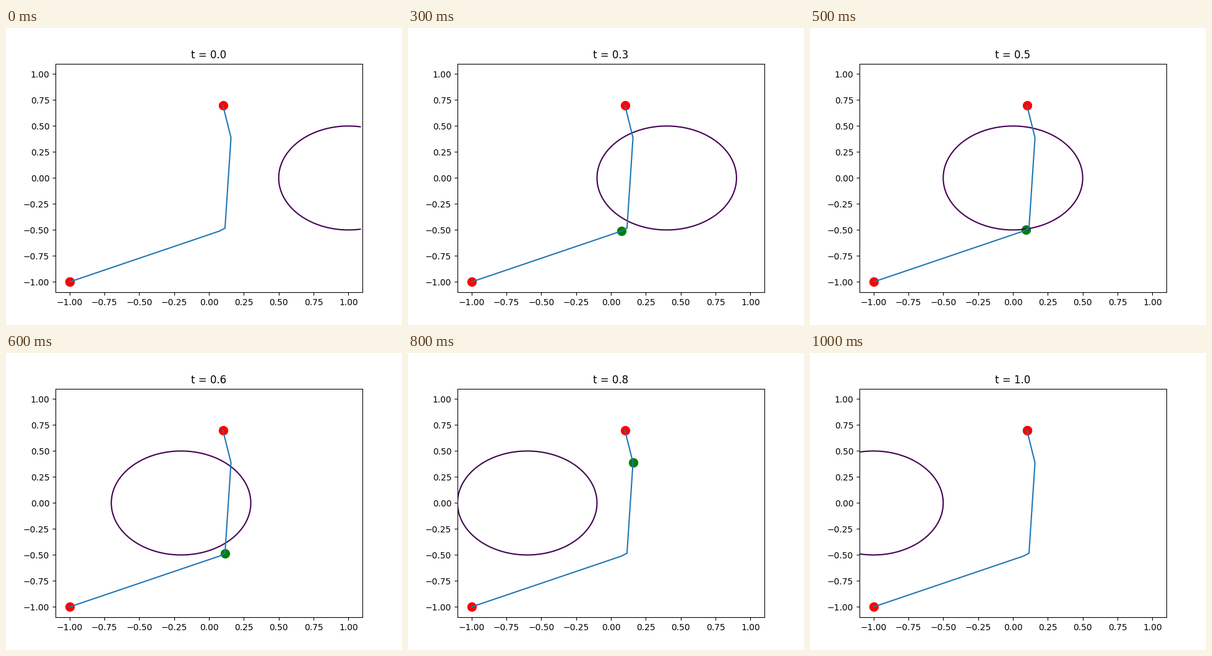
These frames come from a looping animation (640 by 480 pixels, 1.1 s). A matplotlib script:

```python
import numpy as np
import matplotlib.pyplot as plt
from matplotlib.animation import FuncAnimation

STEPS = 11
RADIUS = 0.5
X_MAX = 1.09  # the obstacle outline stops just short of the right edge

# Piecewise linear path with equally timed nodes
NODES = np.array([(-1, -1), (0.075, -0.511), (0.075, -0.511),
                  (0.115, -0.483), (0.158, 0.388), (0.1, 0.7)])
NODE_T = np.linspace(0, 1, len(NODES))
THETA = np.linspace(0, 2 * np.pi, 1441)


def position(t):
    return [np.interp(t, NODE_T, NODES[:, k]) for k in (0, 1)]


def outline(t):
    x = 1 - 2 * t + RADIUS * np.cos(THETA)
    y = RADIUS * np.sin(THETA)
    return np.where(x <= X_MAX, x, np.nan), y


fig, ax = plt.subplots(figsize=(6.4, 4.8), dpi=100)
ax.set(xlim=(-1.1, 1.1), ylim=(-1.1, 1.1))

dot = dict(marker="o", markersize=10, linestyle="none", zorder=1)
robot, = ax.plot([], [], color="green", **dot)
ax.plot(*NODES[[0, -1]].T, color="red", **dot)
obstacle, = ax.plot([], [], color="#440154", lw=1.5, solid_capstyle="butt")
ax.plot(*NODES.T, color="#1f77b4", lw=1.5)
title = ax.set_title("t = 0.0")


def update(i):
    t = i / (STEPS - 1)
    x, y = position(t)
    robot.set_data([x], [y])
    obstacle.set_data(*outline(t))
    title.set_text(f"t = {t:.1f}")
    return robot, obstacle, title


anim = FuncAnimation(fig, update, frames=STEPS, interval=100, repeat=True,
                     repeat_delay=0)
plt.show()
```
